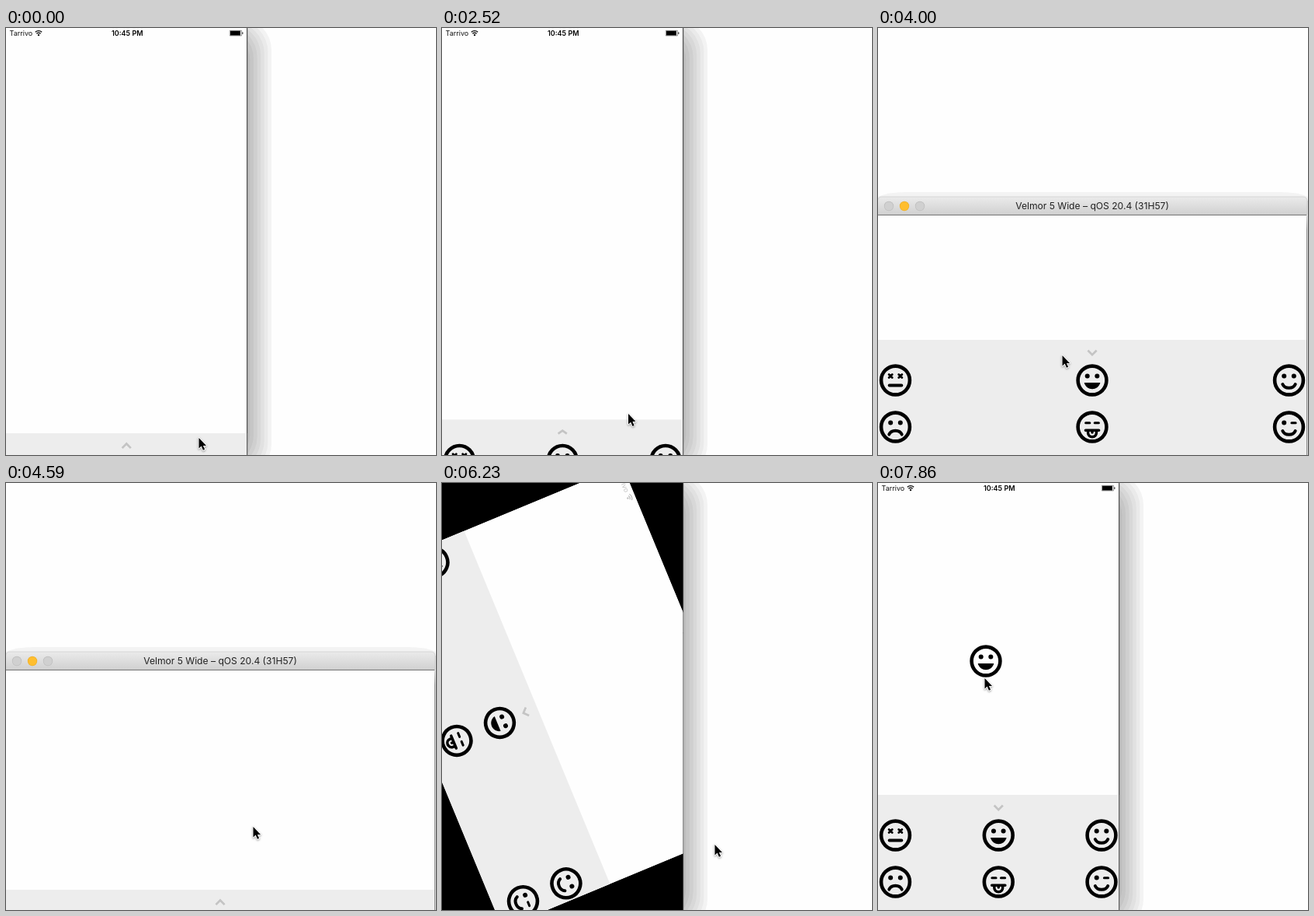
Recreate the animation shown at these times as an HTML page with a canvas. Size 554 by 549 pixels, loop 8000 ms.

```html
<!DOCTYPE html>
<html lang="en">
<head>
<meta charset="utf-8">
<title>Emoji drawer</title>
<style>
  html, body { margin: 0; width: 100%; height: 100%; overflow: hidden; background: #fefefe; }
  canvas { display: block; }
</style>
</head>
<body>
<canvas id="stage" width="554" height="549"></canvas>
<script>
const ctx = document.getElementById('stage').getContext('2d');
const LOOP = 8000, STEPS = 54;
const SHORT = 310.5, LONG = 552, DRAWER = 150, TURN_TIME = 3;
const PAPER = '#fefefe', FONT = 'Inter, Roboto, sans-serif';

const mix = (a, b, p) => a + (b - a) * p;

// Cosine ease from 0 to 1 between two steps.
function ease(step, from, to) {
  const p = Math.max(0, Math.min(1, (step - from) / (to - from)));
  return (1 - Math.cos(Math.PI * p)) / 2;
}

// Swipes down add to the drawer's closing, swipes up take it away.
const closedPart = step => 1 - ease(step, 4.5, 8) + ease(step, 11, 15) - ease(step, 16, 20)
  + ease(step, 28, 31) - ease(step, 35, 39);

// Each move: from step, to step, x, y.
const cursorMoves = [
  [0, 1, 247, 528], [4, 9, 243.6, 426], [11, 15, 240, 508], [16, 20, 237, 420],
  [28, 31, 318, 441], [31, 35, 345, 512], [35, 39, 351, 464],
  [44, 47, 153, 474], [47.7, 53, 137, 250]
];

const cursorAt = step => cursorMoves.reduce(([x, y], [from, to, nextX, nextY]) => {
  const p = ease(step, from, to);
  return [mix(x, nextX, p), mix(y, nextY, p)];
}, [248, 526]);

function rect(x, y, w, h, color) {
  ctx.fillStyle = color;
  ctx.fillRect(x, y, w, h);
}

function dot(x, y, r, color) {
  ctx.fillStyle = color;
  ctx.beginPath();
  ctx.arc(x, y, r, 0, 7);
  ctx.fill();
}

function stroke(path, width, color = '#000') {
  ctx.lineWidth = width;
  ctx.strokeStyle = color;
  ctx.stroke(new Path2D(path));
}

function verticalFade(y1, y2, top, bottom) {
  const fade = ctx.createLinearGradient(0, y1, 0, y2);
  fade.addColorStop(0, top);
  fade.addColorStop(1, bottom);
  return fade;
}

function text(label, x, y, font, align, color) {
  ctx.font = font + ' ' + FONT;
  ctx.textAlign = align;
  ctx.textBaseline = 'middle';
  ctx.fillStyle = color;
  ctx.fillText(label, x, y);
}

const openEye = x => dot(x, -5.5, 3, '#000');
const shutEye = x => stroke(`M${x - 2.6} -5.3h5.2`, 3);
const crossEye = x => stroke(`M${x - 2.1} -7.6l4.2 4.2m0 -4.2l-4.2 4.2`, 2.8);
const openEyes = () => [-6.3, 6.3].forEach(openEye);
const smile = () => stroke('M-8.2 5C-5.5 11.4 5.5 11.4 8.2 5', 4);

const faces = {
  dazed() { [-6.3, 6.3].forEach(crossEye); stroke('M-7.8 6.5H7.8', 4); },
  grin() {
    openEyes();
    ctx.fillStyle = '#000';
    ctx.fill(new Path2D('M-10.3 3H10.3C7.6 14 -7.6 14 -10.3 3Z'));
  },
  happy() { openEyes(); smile(); },
  sad() { openEyes(); stroke('M-8.2 9.6C-5.5 3 5.5 3 8.2 9.6', 4); },
  tongue() {
    [-5.8, 5.8].forEach(shutEye);
    stroke('M-8.6 4.3H8.6M-5.4 5V7.5A5.4 5.2 0 0 0 5.4 7.5V5M0 5V7', 3.5);
  },
  wink() { openEye(-6.3); shutEye(6); smile(); }
};

function emoji(name, x, y) {
  ctx.save();
  ctx.translate(x, y);
  ctx.lineCap = 'round';
  stroke('M18.4 0A18.4 18.4 0 1 1 -18.4 0A18.4 18.4 0 1 1 18.4 0Z', 4.6);
  faces[name]();
  ctx.restore();
}

function statusBar(width, alpha) {
  ctx.save();
  ctx.globalAlpha = alpha;
  text('Tarrivo', 4.5, 8.2, '9px', 'left', '#111');
  text('10:45 PM', width / 2 + 1, 8.2, '600 9px', 'center', '#000');
  stroke('M37.8 6.2A6.2 6.2 0 0 1 46.2 6.2M39.4 8.2A4 4 0 0 1 44.6 8.2', 1.3);
  dot(42, 10, 1.2, '#000');
  const x = width - 22.5;
  stroke(`M${x + .3} 4.3h15.2v6.6h-15.2z`, .6, '#555');
  rect(x + 1, 4.7, 13, 5.8, '#000');
  rect(x + 16.2, 6.4, 1.2, 2.4, '#333');
  ctx.restore();
}

function drawer(width, top, closed) {
  rect(0, top, width, DRAWER + 5, '#ededed');
  const mid = width / 2, y = top + 16.3, bend = 2.8 * (1 - 2 * closed);
  stroke(`M${mid - 5.6} ${y - bend}L${mid} ${y + bend}L${mid + 5.6} ${y - bend}`, 2.7, '#c4c4c4');
  Object.keys(faces).forEach((name, i) =>
    emoji(name, mix(22.5, width - 22.5, i % 3 / 2), top + 52 + 60 * Math.floor(i / 3)));
}

// The app screen, turned about its centre; wide runs from 0 (portrait) to 1 (landscape).
function screen(cx, cy, wide, angle, closed) {
  const width = mix(SHORT, LONG, wide), height = mix(LONG, SHORT, wide);
  ctx.translate(cx, cy);
  ctx.rotate(angle);
  ctx.translate(-width / 2, -height / 2);
  ctx.beginPath();
  ctx.rect(0, 0, width, height);
  ctx.clip();
  rect(0, 0, width, height, PAPER);
  statusBar(width, 1 - wide);
  drawer(width, height - DRAWER + closed * (120 + 2 * wide), closed);
}

function viewport(x, y, w, h) {
  rect(x, y, w, h, '#000');
  ctx.beginPath();
  ctx.rect(x, y, w, h);
  ctx.clip();
}

function portraitWindow() {
  for (let i = 0; i < 7; i++) {
    const inset = i * 4.6, gray = 243 - i * 9;
    ctx.fillStyle = `rgb(${gray},${gray},${gray})`;
    ctx.beginPath();
    ctx.roundRect(-100, -12 + inset / 2, 442 - inset, 587 - inset, 40);
    ctx.fill();
  }
  rect(300, 0, 11.3, 549, '#6a6a6a');
  viewport(0, 0, SHORT, 549);
}

function landscapeWindow() {
  ctx.fillStyle = '#f3f3f3';
  ctx.fill(new Path2D('M0 217Q12 211 36 211H518Q542 211 554 217V240H0Z'));
  rect(553, 222, 1, 327, '#dadada');
  rect(552, 240, 1, 309, verticalFade(240, 260, '#d8d8d8', '#8a8a8a'));
  ctx.fillStyle = verticalFade(217, 240, '#ebebeb', '#d0d0d0');
  ctx.beginPath();
  ctx.roundRect(-.5, 217, 553.5, 23, [5, 5, 0, 0]);
  ctx.fill();
  ctx.lineWidth = .6;
  ctx.strokeStyle = '#c4c4c4';
  ctx.stroke();
  ['#d0d0d0', '#ffbe2f', '#d0d0d0'].forEach((color, i) => {
    dot(14 + 20 * i, 229, 6.2, i === 1 ? '#ecb02e' : '#bdbdbd');
    dot(14 + 20 * i, 229, 5.5, color);
  });
  text('Velmor 5 Wide – qOS 20.4 (31H57)', 276, 229.5, '12.1px', 'center', '#222');
  viewport(0, 240, LONG, 309);
}

function cursor(x, y) {
  const arrow = new Path2D('M0 0V15L3.5 11.8L6 17.6L8.5 16.5L6 11H10.6Z');
  ctx.save();
  ctx.translate(x + .5, y + 1);
  ctx.scale(.9, .9);
  ctx.lineJoin = 'round';
  ctx.lineWidth = 2;
  ctx.strokeStyle = '#fff';
  ctx.shadowColor = 'rgba(0,0,0,.4)';
  ctx.shadowBlur = 2.5;
  ctx.shadowOffsetY = 1;
  ctx.stroke(arrow);
  ctx.shadowColor = 'transparent';
  ctx.fillStyle = '#000';
  ctx.fill(arrow);
  ctx.restore();
}

function draw(step) {
  const closed = closedPart(step), [x, y] = cursorAt(step);
  const turned = ease(step, 22, 22 + TURN_TIME), returned = ease(step, 41, 41 + TURN_TIME);
  const wide = turned - returned;

  rect(0, 0, 554, 549, PAPER);
  ctx.save();
  // The window frame flips at once; the screen inside turns after it.
  if (turned > 0 && returned === 0) {
    landscapeWindow();
    screen(276, 395.75, wide, -Math.PI / 2 * (1 - turned), closed);
  } else {
    portraitWindow();
    screen(SHORT / 2, 275, wide, Math.PI / 2 * wide, closed);
  }
  ctx.restore();
  if (wide > 0 && returned === 0) rect(0, 240, LONG, 1, '#777');
  if (step >= 47) emoji('grin', x + 2, y - 21);
  cursor(x, y);
}

function tick() {
  const time = performance.now() % LOOP;
  draw(Math.min(STEPS - 1, Math.floor((time + 5) * STEPS / LOOP)));
  requestAnimationFrame(tick);
}
tick();
</script>
</body>
</html>
```
